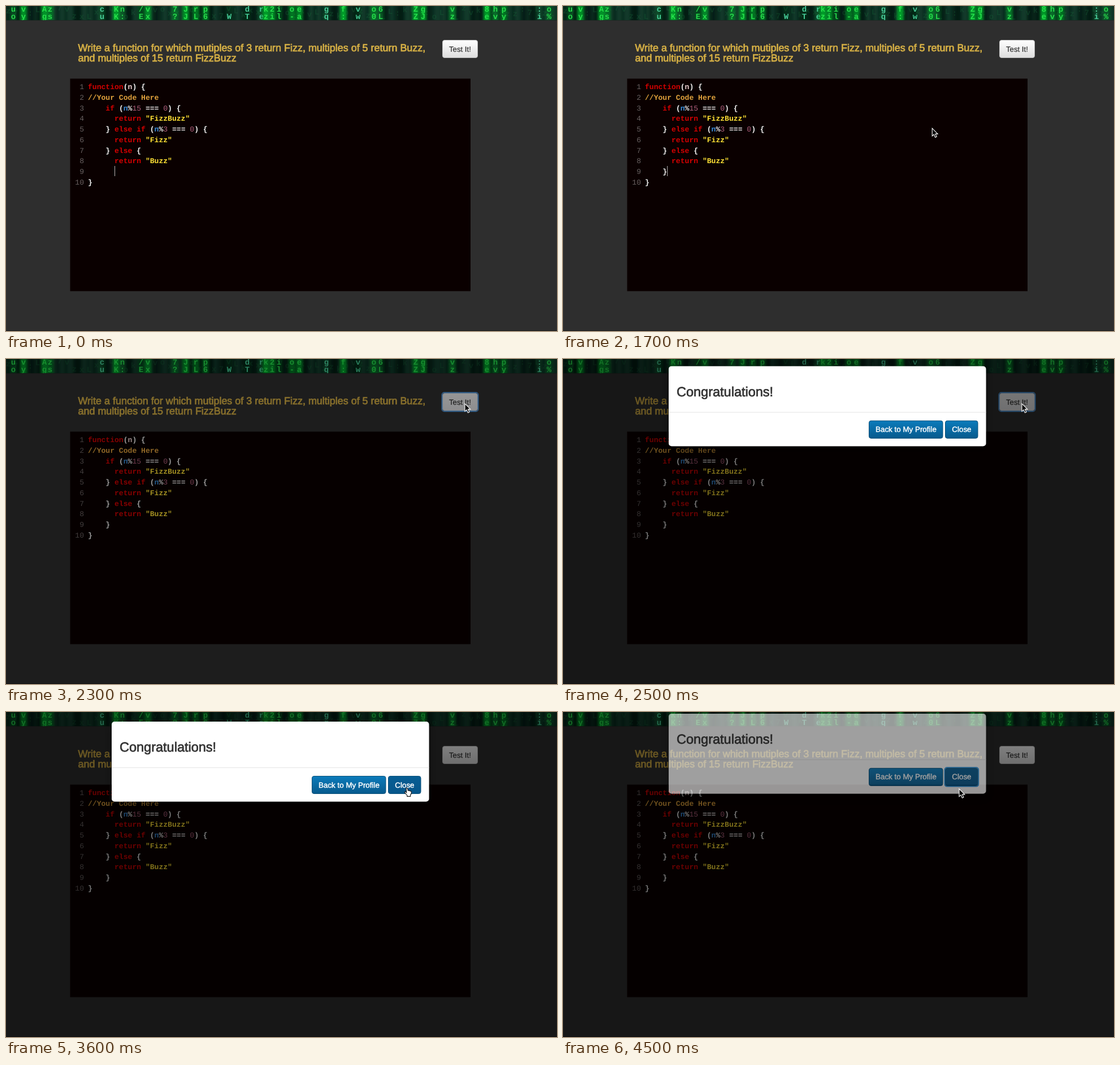
These frames come from a looping animation (975 px wide and 575 px high, 4.6 s). An HTML page:

```html
<!DOCTYPE html>
<html lang="en">
<head>
<meta charset="utf-8">
<title>Coding exercise</title>
<style>
  html, body { margin: 0; width: 100%; height: 100%; overflow: hidden; background: #2e2e2e; }
  svg { display: block; width: 975px; height: 575px; }
  text { font-family: "Liberation Sans", Arial, sans-serif; white-space: pre; text-rendering: geometricPrecision; }
  .mono text { font: 13.07px "Liberation Mono", "Courier New", monospace; }
  .mono .bold { font-weight: bold; }
  .rain text { font: bold 14px "Liberation Mono", monospace; text-anchor: middle; }
  .title { font-size: 17.95px; fill: #d6b045; stroke: #d6b045; stroke-width: .75px; }
  .label { font-size: 13.4px; fill: #fff; stroke: #fff; stroke-width: .45px; }
</style>
</head>
<body>
<svg viewBox="0 0 975 575">
  <defs>
    <linearGradient id="light" x2="0" y2="1"><stop stop-color="#fff"/><stop offset="1" stop-color="#dedede"/></linearGradient>
    <linearGradient id="pressed" x2="0" y2="1"><stop stop-color="#ededed"/><stop offset="1" stop-color="#e0e0e2"/></linearGradient>
    <linearGradient id="blue" x2="0" y2="1"><stop stop-color="#0b7bbb"/><stop offset="1" stop-color="#075a8d"/></linearGradient>
    <linearGradient id="navy" x2="0" y2="1"><stop stop-color="#075e94"/><stop offset="1" stop-color="#07568a"/></linearGradient>
    <filter id="soft" x="-100%" y="-50%" width="300%" height="200%"><feGaussianBlur stdDeviation="2.2 1.5"/></filter>
    <filter id="halo" x="-20%" y="-30%" width="140%" height="160%"><feGaussianBlur stdDeviation=".6"/></filter>
    <filter id="shadow" x="-10%" y="-20%" width="120%" height="150%"><feDropShadow dx="0" dy="5" stdDeviation="7" flood-opacity=".5"/></filter>
    <clipPath id="strip"><rect width="975" height="25"/></clipPath>
  </defs>

  <rect width="975" height="575" fill="#2e2e2e"/>
  <rect y="574" width="975" height="1" fill="#191919"/>
  <g id="rain" class="rain" clip-path="url(#strip)"><rect width="975" height="25" fill="#0b2c20"/></g>
  <rect y="25" width="975" height="1" fill="#222825"/>

  <text class="title" x="127.5" y="80">Write a function for which mutiples of 3 return Fizz, multiples of 5 return Buzz,</text>
  <text class="title" x="127.5" y="98">and multiples of 15 return FizzBuzz</text>

  <rect id="testHalo" x="771.3" y="59.3" width="64.4" height="33.4" rx="4" fill="none" stroke="#4d9be6" stroke-width="1.5" filter="url(#halo)"/>
  <rect id="test" x="772.5" y="60.5" width="62" height="31" rx="3.5"/>
  <text x="784" y="81" font-size="13.2" fill="#2b2b2b" stroke="#2b2b2b" stroke-width=".15">Test It!</text>

  <rect x="113.5" y="128.5" width="708.5" height="376" fill="#0a0000"/>
  <g id="code" class="mono"></g>
  <rect id="caret" y="283" width="1" height="18" fill="#b8b8b8"/>

  <rect id="backdrop" width="975" height="575" fill="#000"/>

  <g id="modal">
    <rect x="187" y="17" width="561.5" height="141.5" rx="5" fill="#fff" filter="url(#shadow)"/>
    <text x="201" y="70.3" font-size="23.5" fill="#333" stroke="#333" stroke-width=".7">Congratulations!</text>
    <rect x="187" y="98" width="561.5" height="1" fill="#e5e5e5"/>
    <rect x="541.5" y="113.5" width="130.5" height="31" rx="3.5" fill="url(#blue)" stroke="#0a5079"/>
    <text class="label" x="553" y="133.5">Back to My Profile</text>
    <rect id="closeHalo" x="675.5" y="112.3" width="59.7" height="33.4" rx="4" fill="none" stroke="#2f9be8" stroke-width="2" filter="url(#halo)"/>
    <rect id="close" x="676.5" y="113.5" width="57.5" height="31" rx="3.5" stroke="#0a5079"/>
    <text class="label" x="688.3" y="133.5">Close</text>
  </g>

  <g id="pointer">
    <path id="arrow" d="M0 0V13.6L3.1 10.8 5.4 16 7.9 14.9 5.6 9.9H9.8Z" fill="#000" stroke="#fff" stroke-width="1.1"/>
    <path id="hand" d="M3 1Q4.5-.6 5.6 1.4L6.3 5Q7.6 4.1 8.4 5.4Q9.6 4.6 10.3 6Q12 5.4 12.3 7.5Q12.6 11 10.6 13V15.4H4.8V13.4Q2.6 11 .4 8.6Q0 6.7 2 7.1L3.7 8.6Z" fill="#fff" stroke="#111" stroke-width="1.1"/>
  </g>
</svg>

<script>
const LOOP = 4600, STEP = 100;
const CHAR = 7.84, LEFT = 145, PITCH = 18.77;
const TYPED = 500, PRESS = 2100, FADE_IN = 2190, SHOW = 2300, UNFOCUS = 2700, CLICK = 4400, HIDE = 4438;

const $ = id => document.getElementById(id);
const clamp = v => Math.max(0, Math.min(1, v));
const easeOut = p => 1 - (1 - p) ** 2;

function add(parent, tag, attrs, content = "") {
  const el = document.createElementNS("http://www.w3.org/2000/svg", tag);
  for (const key in attrs) el.setAttribute(key, attrs[key]);
  el.textContent = content;
  parent.append(el);
  return el;
}
const show = (el, on) => el.setAttribute("visibility", on ? "visible" : "hidden");

// Banner: [x, two glyphs, glow strength]
const columns = [
  [13, "uo", .3], [31, "vy", .9], [68, "Ag", .9], [78, "zs", .6], [170, "cu", .2], [195, "KK", 1], [206, "n:", .3],
  [239, "/E", .3], [251, "vx", .8], [299, "7?", .5], [318, "JJ", .9], [336, "rL", .7], [353, "p6", .6], [395, " W", .1],
  [427, "dT", .1], [452, "re", .2], [460, "kz", 1], [471, "2i", .8], [483, "il", .3], [506, "o-", .7], [519, "ea", .8],
  [567, "gq", .1], [597, "f:", 1], [623, "vw", .1], [651, "o0", .6], [663, "6L", .3], [725, "ZZ", .9], [738, "gJ", .9],
  [790, "vz", .6], [851, "8e", 1], [866, "hv", .5], [881, "py", .7], [944, ":i", .1], [961, "o%", .3]
];

function buildRain() {
  const rain = $("rain");
  let seed = 11;
  const rand = () => (seed = seed * 16807 % 2147483647) / 2147483647;
  for (let x = 4; x < 975; x += 13) {
    add(rain, "rect", { x, y: -4, width: 4 + rand() * 8, height: 33, fill: rand() < .5 ? "#04140e" : "#12402f", opacity: .7, filter: "url(#soft)" });
    add(rain, "text", { x, y: 8 + rand() * 16, fill: "#1b6b3c", opacity: .3 }, "zkx7vL:o"[Math.floor(rand() * 8)]);
  }
  for (const [x, glyphs, glow] of columns) {
    add(rain, "rect", { x: x - 6, y: -4, width: 12, height: 33, fill: "#06a62c", opacity: glow * .9, filter: "url(#soft)" });
    const fill = glow < .25 ? "#52e6ae" : "#2cf052";
    [...glyphs].forEach((g, i) => add(rain, "text", { x, y: 10 + i * 13, fill, opacity: .85 }, g));
  }
}

const lines = [
  "function(n) {",
  "//Your Code Here",
  "    if (n%15 === 0) {",
  "      return \"FizzBuzz\"",
  "    } else if (n%3 === 0) {",
  "      return \"Fizz\"",
  "    } else {",
  "      return \"Buzz\"",
  "    }",
  "}"
];
const rules = [
  [/^\/\//, "#e2a33d"],
  [/^"/, "#ffe135"],
  [/^(function|if|else|return)$/, "#d60000"],
  [/^\d/, "#b0607c"],
  [/^n$/, "#3a8fdc"]
];

function buildCode() {
  const code = $("code");
  return lines.map((line, row) => {
    const y = 147 + row * PITCH;
    add(code, "text", { x: 138, y, "text-anchor": "end", fill: "#686060" }, row + 1);
    const group = add(code, "g", {});
    for (const m of line.matchAll(/\/\/.*|"[^"]*"|\w+|[^\s\w"]+/g)) {
      const rule = rules.find(([test]) => test.test(m[0]));
      const fill = row === 0 && m[0] === "n" ? "#ecd2d2" : rule ? rule[1] : "#f2f2f2";
      const attrs = { x: LEFT + m.index * CHAR, y, fill };
      if (!/^\d/.test(m[0])) attrs.class = "bold";
      add(group, "text", attrs, m[0]);
    }
    return group;
  });
}

// Pointer path: [time, x, y]
const path = [
  [1500, 560, 290], [2000, 825, 81], [2200, 822, 78], [2300, 812, 79],
  [2600, 812, 79], [3300, 705, 134], [4400, 705, 134], [4500, 701, 136]
];

function pointerAt(t) {
  const i = path.findIndex(p => p[0] > t);
  if (i < 0) return path[path.length - 1].slice(1);
  if (i === 0) return path[0].slice(1);
  const [t0, x0, y0] = path[i - 1], [t1, x1, y1] = path[i];
  const p = (t - t0) / (t1 - t0), k = p * p * (3 - 2 * p);
  return [x0 + (x1 - x0) * k, y0 + (y1 - y0) * k];
}

buildRain();
const brace = buildCode()[8];

function draw(t) {
  const typed = t >= TYPED;
  show(brace, typed);
  $("caret").setAttribute("x", LEFT + (typed ? 5 : 6) * CHAR);
  show($("caret"), t < PRESS && (!typed || (t - TYPED) % 1060 < 530));

  const focused = t >= PRESS && t < UNFOCUS;
  show($("testHalo"), focused);
  $("test").setAttribute("fill", focused ? "url(#pressed)" : "url(#light)");
  $("test").setAttribute("stroke", focused ? "#8fb4d8" : "#bcbcbc");

  $("backdrop").setAttribute("opacity", .5 * clamp((t - FADE_IN) / 150));

  const entering = easeOut(clamp((t - SHOW) / 300)), leaving = easeOut(clamp((t - HIDE) / 300));
  const shift = -38 * (1 - entering + leaving);
  $("modal").setAttribute("transform", `translate(0 ${shift})`);
  $("modal").setAttribute("opacity", clamp((t - SHOW) / 150) * (1 - clamp((t - HIDE) / 150)));

  const [x, y] = pointerAt(t);
  const overClose = t > SHOW && x > 676 && x < 735 && y > 113 + shift && y < 145 + shift;
  const clicked = t >= CLICK;
  show($("closeHalo"), clicked);
  $("close").setAttribute("fill", overClose || clicked ? "url(#navy)" : "url(#blue)");

  const visible = t >= path[0][0];
  $("pointer").setAttribute("transform", `translate(${x} ${y})`);
  show($("arrow"), visible && !overClose);
  show($("hand"), visible && overClose);
}

const start = performance.now();
function tick() {
  const t = (performance.now() - start) % LOOP;
  draw(Math.floor(t / STEP) * STEP);
  requestAnimationFrame(tick);
}
tick();
</script>
</body>
</html>
```
